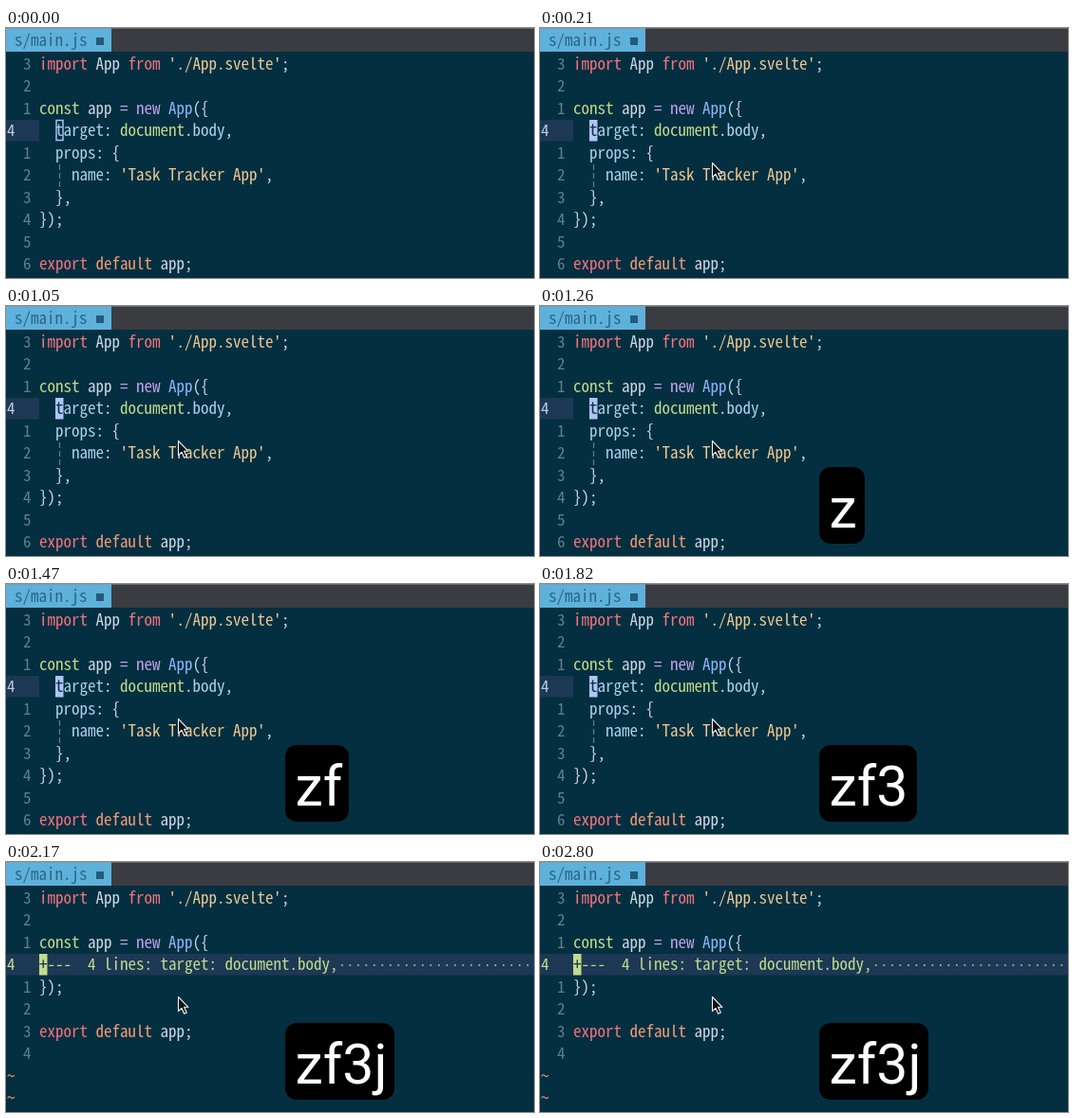
Animation, 556 px wide and 264 px high, one loop 2870 ms. Source, as an HTML page:

```html
<!DOCTYPE html>
<html lang="en">
<head>
<meta charset="utf-8">
<title>Code folding</title>
<style>
  html, body { margin: 0; width: 100%; height: 100%; overflow: hidden; background: #042f40; }
  svg { display: block; width: 556px; height: 264px; }
  .mono {
    font-family: "Noto Sans Mono CJK JP", "Noto Sans Mono CJK SC", "Noto Sans Mono", monospace;
    font-size: var(--code-size, 17px);
  }
  text { white-space: pre; }
  .key text { font: 59px Roboto, sans-serif; fill: #fff; }

  /* hard state changes: each part is shown for one span of the loop */
  .unfocused, .focused, .open, .folded, .key { animation: 2870ms step-end infinite; }
  .unfocused { animation-name: unfocused; }
  .focused { animation-name: focused; }
  .open { animation-name: open; }
  .folded, .key4 { animation-name: folded; }
  .key1 { animation-name: key1; }
  .key2 { animation-name: key2; }
  .key3 { animation-name: key3; }
  @keyframes unfocused { 0% { opacity: 1 } 2.439%, 100% { opacity: 0 } }
  @keyframes focused { 0% { opacity: 0 } 2.439%, 100% { opacity: 1 } }
  @keyframes open { 0% { opacity: 1 } 70.732%, 100% { opacity: 0 } }
  @keyframes folded { 0% { opacity: 0 } 70.732%, 100% { opacity: 1 } }
  @keyframes key1 { 0% { opacity: 0 } 39.024% { opacity: 1 } 46.341%, 100% { opacity: 0 } }
  @keyframes key2 { 0% { opacity: 0 } 46.341% { opacity: 1 } 56.098%, 100% { opacity: 0 } }
  @keyframes key3 { 0% { opacity: 0 } 56.098% { opacity: 1 } 70.732%, 100% { opacity: 0 } }
</style>
</head>
<body>
<svg viewBox="0 0 556 264">
  <rect width="556" height="264" fill="#042f40"/>
  <rect width="556" height="25" fill="#3b3c42"/>
  <rect width="111" height="25" fill="#5db1da"/>
  <rect width="556" height="1" fill="#8b9299" opacity=".5"/>
  <text class="mono" x="9" y="19" fill="#2b6587">s/main.js</text>
  <rect x="95" y="10" width="8" height="8" fill="#255a7a"/>

  <g id="shared" class="mono"></g>

  <g class="open">
    <rect y="97" width="35" height="22.5" fill="#1d3854"/>
    <g id="open" class="mono"></g>
    <path d="M56.5 144V168" stroke="#627e82" stroke-width="1.2" stroke-dasharray="6 3"/>
    <rect class="unfocused" x="53" y="97.5" width="7" height="21" fill="none" stroke="#a9c0f2" stroke-width="1.5"/>
    <g class="focused">
      <rect x="52" y="97" width="8.5" height="22.5" fill="#afc5f5"/>
      <g id="blockCursor" class="mono"></g>
    </g>
  </g>

  <g class="folded">
    <rect y="97" width="556" height="22.5" fill="#1d3854"/>
    <rect x="35" y="97" width="8.5" height="22.5" fill="#c3dc8c"/>
    <g id="folded" class="mono"></g>
    <path d="M353 109H556" stroke="#b9d68a" stroke-width="1.7" stroke-dasharray="1.7 6.8"/>
  </g>

  <path class="focused" d="M181.5 142.5V157.5L185 154.3L187.7 160.3L190.3 159.1L187.6 153.3H192Z"
        fill="#111" stroke="#f4f4f4" stroke-width="1.1" stroke-linejoin="round"/>
  <g id="keys"></g>
</svg>

<script>
  const CELL = 8.5, ROW = 23.44, LEFT = 35, BASE = 44;
  const NS = "http://www.w3.org/2000/svg";
  const color = {
    red: "#f4727c", orange: "#f39b78", plain: "#cbd7e3", string: "#ecc792",
    green: "#c0dc8b", blue: "#8db5fa", violet: "#c1a2ed", prop: "#add0ec",
    gutter: "#607f8b", current: "#b9cbe0", dark: "#0a3044"
  };
  const byId = id => document.getElementById(id);

  function add(parent, tag, attrs, content = "") {
    const node = document.createElementNS(NS, tag);
    for (const [name, value] of Object.entries(attrs)) node.setAttribute(name, value);
    node.textContent = content;
    return parent.appendChild(node);
  }

  // Writes "color:text" tokens one after the other on the character grid.
  function line(id, row, col, ...tokens) {
    for (const token of tokens) {
      const cut = token.indexOf(":");
      const content = token.slice(cut + 1);
      add(byId(id), "text", {
        x: LEFT + col * CELL, y: BASE + row * ROW, fill: color[token.slice(0, cut)]
      }, content);
      col += content.length;
    }
  }

  function gutter(id, firstRow, numbers) {
    [...numbers].forEach((n, i) => line(id, firstRow + i, -2, "gutter:" + n));
  }

  // Keep the character grid whichever monospace face is present.
  const pen = document.createElement("canvas").getContext("2d");
  const face = getComputedStyle(document.querySelector(".mono")).fontFamily;
  pen.font = `100px ${face}`;
  document.documentElement.style.setProperty("--code-size", 100 * CELL / pen.measureText("M").width + "px");

  gutter("shared", 0, "321");
  line("shared", 0, 0, "red:import", "plain: App ", "red:from", "string: './App.svelte'", "plain:;");
  line("shared", 2, 0, "green:const", "plain: app ", "violet:= ", "violet:new ", "blue:App", "plain:({");

  line("open", 3, -4, "current:4");
  gutter("open", 4, "123456");
  line("open", 3, 2, "prop:target", "plain:: ", "green:document", "plain:.", "prop:body", "plain:,");
  line("open", 4, 2, "prop:props", "plain:: {");
  line("open", 5, 4, "prop:name", "plain:: ", "string:'Task Tracker App'", "plain:,");
  line("open", 6, 2, "plain:},");
  line("open", 7, 0, "plain:});");
  line("open", 9, 0, "red:export ", "orange:default", "plain: app;");
  line("blockCursor", 3, 2, "dark:t");

  line("folded", 3, -4, "green:4");
  line("folded", 3, 0, "dark:+", "green:---  4 lines: target: document.body,");
  gutter("folded", 4, "1234");
  line("folded", 4, 0, "plain:});");
  line("folded", 6, 0, "red:export ", "orange:default", "plain: app;");
  line("folded", 8, -4, "orange:~");
  line("folded", 9, -4, "orange:~");

  [["z", 48], ["zf", 67], ["zf3", 103], ["zf3j", 115]].forEach(([typed, width], i) => {
    const group = add(byId("keys"), "g", { class: `key key${i + 1}` });
    add(group, "rect", { x: 294, y: 170, width, height: 81, rx: 12, fill: "#000" });
    add(group, "text", { x: 304.5, y: 234 }, typed);
  });
</script>
</body>
</html>
```
